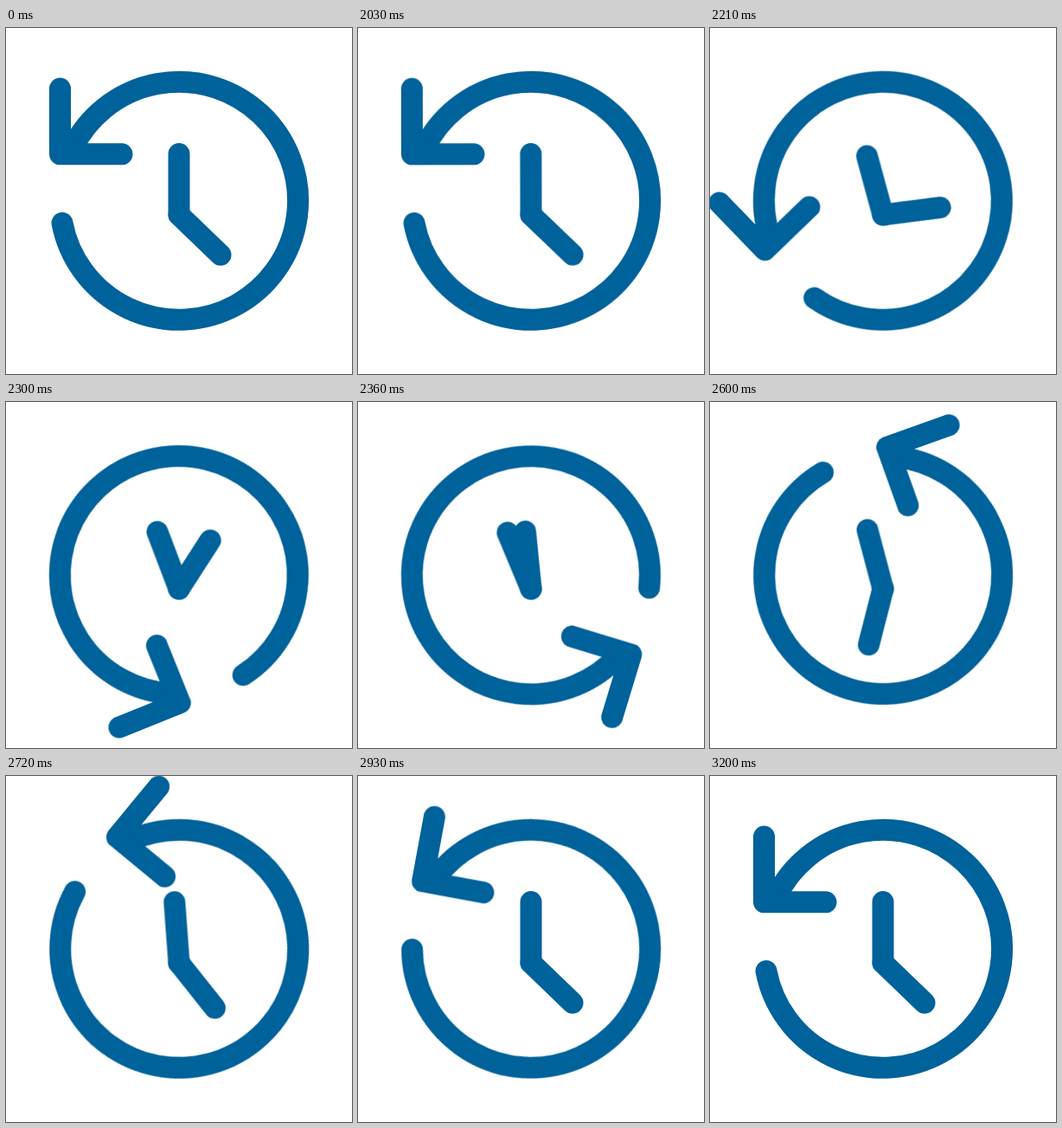
An HTML page that plays this animation: 400x400 px, repeating every 3230 ms.

```html
<!DOCTYPE html>
<html lang="en">
<head>
<meta charset="utf-8">
<title>Rewind clock</title>
<style>
  html, body {
    margin: 0;
    width: 100%;
    height: 100%;
    overflow: hidden;
    background: #fff;
  }
  svg {
    display: block;
    width: 100%;
    height: 100%;
    fill: none;
    stroke: #00629b;
    stroke-width: 25;
    stroke-linecap: round;
    stroke-linejoin: round;
  }
  .dial, .long, .short {
    transform-box: view-box;
    animation: 3230ms linear infinite;
  }
  .dial {
    transform-origin: 200px 200px;
    animation-name: rewind;
  }
  .long, .short {
    transform-origin: 200px 216px;
  }
  .long { animation-name: swing; }
  .short { animation-name: spin; }

  @keyframes rewind {
    0%, 62.59% {
      transform: rotate(0deg);
      animation-timing-function: cubic-bezier(.333, 0, .15, 1);
    }
    99.12%, 100% { transform: rotate(-360deg); }
  }
  @keyframes swing {
    0%, 62.54% {
      transform: rotate(0deg);
      animation-timing-function: cubic-bezier(.2, 0, .5, 1);
    }
    74.37% {
      transform: rotate(-23deg);
      animation-timing-function: cubic-bezier(.48, 0, .74, 1);
    }
    87%, 100% { transform: rotate(0deg); }
  }
  @keyframes spin {
    0%, 62.54% {
      transform: rotate(0deg);
      animation-timing-function: cubic-bezier(.351, 0, .727, 1);
    }
    85.95%, 100% { transform: rotate(-360deg); }
  }
</style>
</head>
<body>
<svg viewBox="0 0 400 400">
  <g class="dial">
    <path d="M76 140.5A137.5 137.5 0 1 1 65 225.5"/>
    <path d="M62.5 70V145.8H134"/>
  </g>
  <path class="long" d="M200 216V145.5"/>
  <path class="short" d="M200 216L248 262.3"/>
</svg>
</body>
</html>
```
